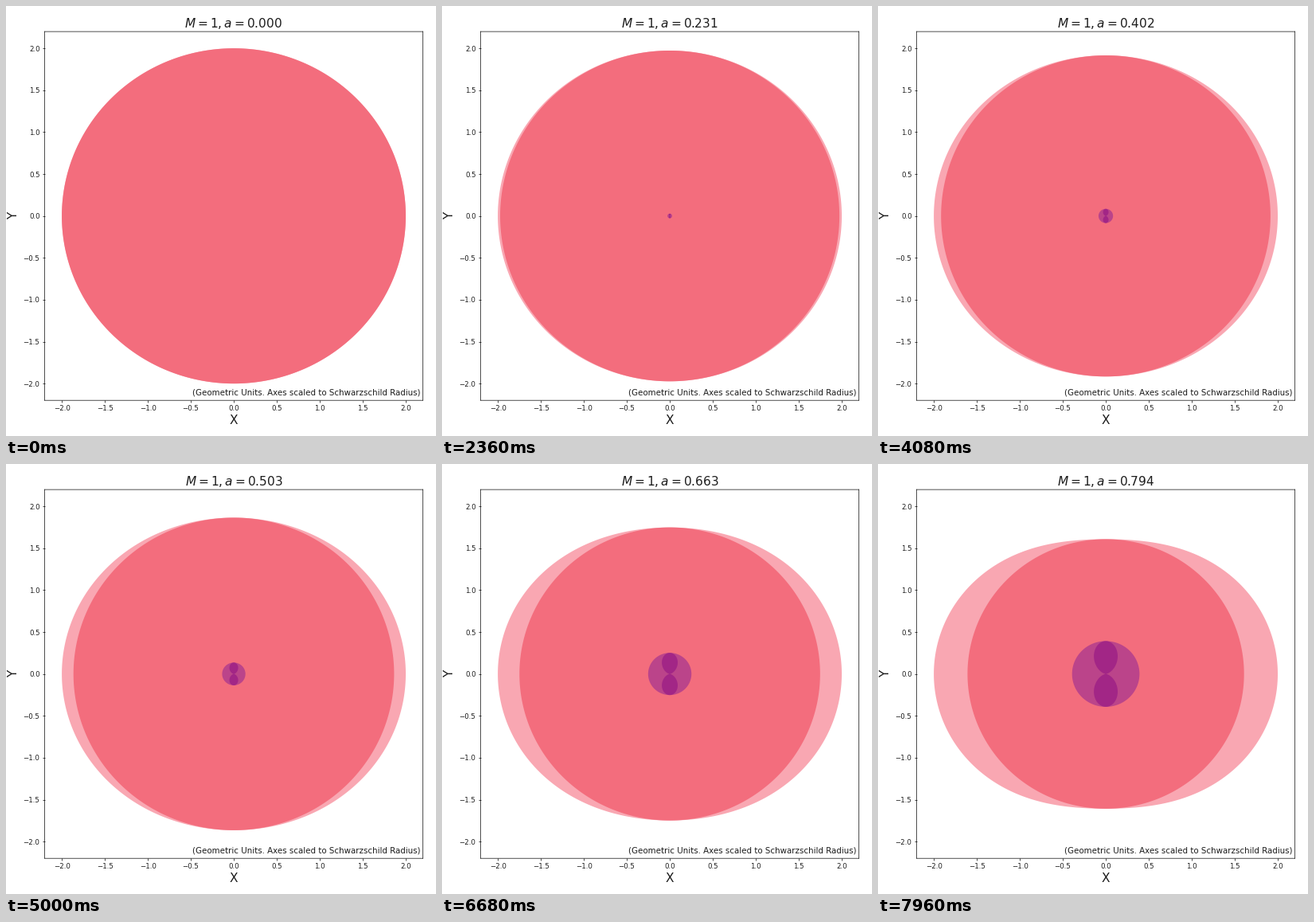
A matplotlib script that plays this animation: 540x540 px, repeating every 8000 ms.

```python
import numpy as np
import matplotlib.pyplot as plt
from matplotlib.animation import FuncAnimation
from matplotlib.patches import Polygon

SIZE = 540
PT = 6 / 7            # scale from nominal points to pixels
LIM = 2.2
FRAMES, INTERVAL = 200, 40
LEFT, RIGHT, TOP, BOTTOM = 48.5, 523.6, 32.1, 495.2
INK = "#1c1c1c"

plt.rcParams["font.family"] = "DejaVu Sans"
fig = plt.figure(figsize=(SIZE / 72, SIZE / 72), dpi=72, facecolor="white")
ax = fig.add_axes([LEFT / SIZE, 1 - BOTTOM / SIZE,
                   (RIGHT - LEFT) / SIZE, (BOTTOM - TOP) / SIZE])
ax.set(xlim=(-LIM, LIM), ylim=(-LIM, LIM))
ticks = np.arange(-2, 2.1, 0.5)
ax.set_xticks(ticks)
ax.set_yticks(ticks)
ax.tick_params(labelsize=10 * PT, length=3.5 * PT, width=0.8 * PT,
               pad=3.5 * PT, labelcolor=INK)
# soft, unsnapped lines
for spine in ax.spines.values():
    spine.set_linewidth(0.8 * PT)
    spine.set_snap(False)


def label(x, y, text, size, **kw):
    """Place text at pixel coordinates measured from the top left."""
    return fig.text(x / SIZE, 1 - y / SIZE, text, fontsize=size * PT,
                    color=INK, va="baseline", **kw)


title = label(286, 26.8, "", 18, ha="center")
label(286, 524.8, "X", 18, ha="center")
label(14, 263.8, "Y", 18, ha="center", rotation=90, rotation_mode="anchor")
label(521, 489, "(Geometric Units. Axes scaled to Schwarzschild Radius)",
      12, ha="right")

theta = np.linspace(0, 2 * np.pi, 721)
unit = np.column_stack([np.sin(theta), np.cos(theta)])


def region(color, z):
    return ax.add_patch(Polygon(unit, closed=True, facecolor=color,
                                edgecolor="none", linewidth=0, zorder=z))


outer_ergo = region("#f9a7b2", 1)
outer_horizon = region("#f36d7d", 1.1)
inner_horizon = region("#bb448a", 1.2)
inner_ergo = region("#a22686", 1.3)


def update(i):
    spin = 2 * (i * INTERVAL // 100) / 199
    horizon = np.sqrt(1 - spin ** 2)
    ergo = np.sqrt(1 - (spin * np.cos(theta)) ** 2)[:, None]
    outer_ergo.set_xy(unit * (1 + ergo))
    outer_horizon.set_xy(unit * (1 + horizon))
    inner_horizon.set_xy(unit * (1 - horizon))
    inner_ergo.set_xy(unit * (1 - ergo))
    for patch in (inner_horizon, inner_ergo):
        patch.set_visible(spin > 0)
    title.set_text(f"$M = 1, a = {spin:.3f}$")
    return outer_ergo, outer_horizon, inner_horizon, inner_ergo, title


anim = FuncAnimation(fig, update, frames=FRAMES, interval=INTERVAL,
                     repeat=True, repeat_delay=0, blit=False)
plt.show()
```
